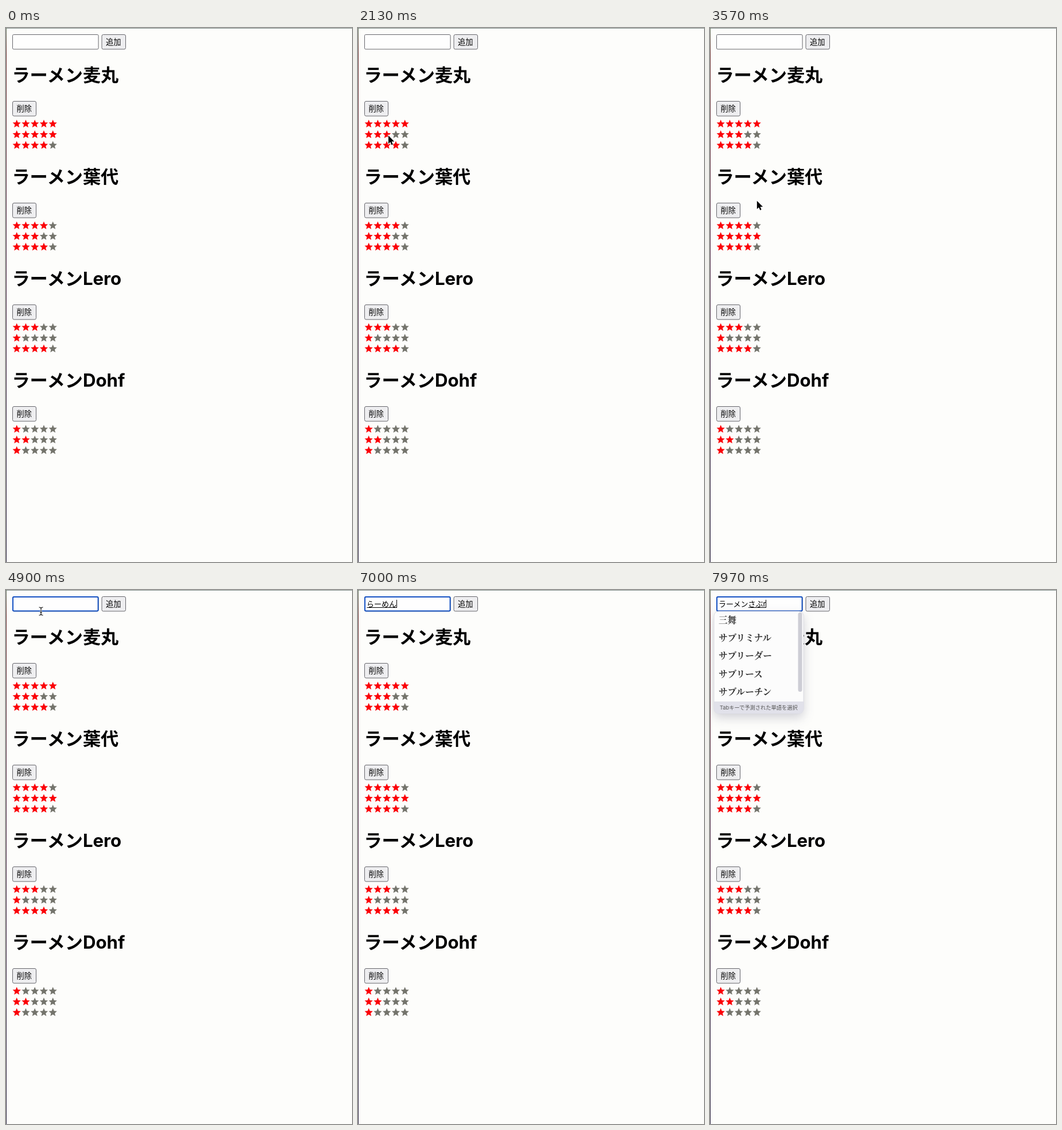
Animation, 603 px wide and 929 px high, one loop 8 s. Source, as an HTML page:

```html
<!DOCTYPE html>
<html lang="ja">
<head>
<meta charset="utf-8">
<title>Ramen ratings</title>
<style>
  html, body { margin: 0; width: 100%; height: 100%; overflow: hidden; background: #fdfdfb; }
  svg { display: block; width: 603px; height: 929px; }
  text { font-family: Inter, "Noto Sans CJK JP", "Noto Sans CJK", sans-serif; fill: #000; white-space: pre; }
  .title { font-size: 31.2px; font-weight: 700; }
  .label { font-size: 13.2px; }
  .typed { font-size: 13px; }
  .btn { fill: #eeeef0; stroke: #66666c; }
  .star { fill: #74746c; }
  .star.on { fill: #fb0007; }
  .word { font: 600 15.6px "Noto Serif CJK JP", "Noto Sans CJK JP", "Noto Sans CJK", serif; fill: #333; }
  .hint { font-size: 9.25px; fill: #555; }
  .panel { filter: drop-shadow(0 7px 9px rgba(40, 40, 80, .2)); }
</style>
</head>
<body>
<svg viewBox="0 0 603 929">
  <defs>
    <linearGradient id="edge" x1="0" y1="0" x2="0" y2="1">
      <stop offset="0" stop-color="#6c8068"/>
      <stop offset=".05" stop-color="#6e3030"/>
      <stop offset=".4" stop-color="#55304c"/>
      <stop offset="1" stop-color="#2b2440"/>
    </linearGradient>
    <clipPath id="round"><rect x="7" y="37" width="156" height="178" rx="8"/></clipPath>
  </defs>
  <rect width="603" height="929" fill="#fdfdfb"/>
  <rect width="603" height="1" fill="#87938f"/>
  <rect width="1" height="929" fill="url(#edge)"/>

  <rect x="11.5" y="11.5" width="149.6" height="25.4" rx="2" fill="#fefefe" stroke="#66666c"/>
  <rect id="ring" x="12" y="12" width="148.6" height="24.4" rx="2" fill="none" stroke="#1552c4" stroke-width="2"/>
  <text id="done" class="typed" x="15" y="28.6"></text>
  <text id="comp" class="typed" y="28.6"></text>
  <rect id="under" y="30" height="1"/>
  <rect id="caret" y="17" width="1" height="14"/>
  <rect class="btn" x="167" y="11.5" width="41.5" height="25.4" rx="2.5"/>
  <text class="label" x="174" y="28.5">追加</text>

  <g id="list"></g>

  <g id="menu">
    <rect class="panel" x="7" y="37" width="156" height="178" rx="8" fill="#fcfcfc" stroke="#d2d2da" stroke-width=".7"/>
    <rect x="7" y="194" width="156" height="21" fill="#e1e1ea" clip-path="url(#round)"/>
    <rect x="153.5" y="39" width="7" height="138" rx="3.5" fill="#cdcdd5"/>
    <g id="words"></g>
    <text class="hint" x="17" y="207.6">Tabキーで予測された単語を選択</text>
  </g>

  <g id="pointer">
    <path id="arrow" d="M0 0V14.4L3.3 11.3L5.5 16.4L7.8 15.4L5.7 10.4H10.2Z" stroke="#fff" paint-order="stroke" stroke-width="1.8"/>
    <g id="beam" fill="none">
      <path d="M-3.5 -7Q0 -7 0 -4V4Q0 7 -3.5 7M3.5 -7Q0 -7 0 -4V4Q0 7 3.5 7M-2 2H2" stroke="#fff" stroke-width="2.6"/>
      <path d="M-3.5 -7Q0 -7 0 -4V4Q0 7 -3.5 7M3.5 -7Q0 -7 0 -4V4Q0 7 3.5 7M-2 2H2" stroke="#111" stroke-width="1.1"/>
    </g>
  </g>
</svg>
<script>
const LOOP = 8000;
const $ = id => document.getElementById(id);
const show = (el, on) => el.setAttribute('visibility', on ? 'visible' : 'hidden');

const shops = [
  ['ラーメン麦丸', [5, 5, 4]],
  ['ラーメン葉代', [4, 3, 4]],
  ['ラーメンLero', [3, 1, 4]],
  ['ラーメンDohf', [1, 2, 1]]
];
const words = ['三舞', 'サブリミナル', 'サブリーダー', 'サブリース', 'サブルーチン'];

// time, x, y
const path = [
  [30, -3, 806], [400, 50, 560], [830, 60, 310], [1100, 54, 203], [1300, 51, 189],
  [1670, 53, 187], [2230, 53, 187], [2530, 74, 295], [2850, 83, 362], [3370, 84, 364],
  [3480, 86, 348], [3570, 82, 303], [3640, 71, 140], [3700, 60, 51],
  [3900, 60, 51], [4200, 61, 37], [6330, 61, 37]
];

// time, committed text, text being composed
const typing = [
  [0, '', ''], [6330, '', 'r'], [6430, '', 'ら'], [6560, '', 'らー'], [6690, '', 'らーm'],
  [6790, '', 'らーめ'], [6900, '', 'らーめn'], [7000, '', 'らーめん'], [7130, '', 'ラーメン'],
  [7300, 'ラーメン', ''], [7390, 'ラーメン', 's'], [7470, 'ラーメン', 'さ'],
  [7630, 'ラーメン', 'さb'], [7720, 'ラーメン', 'さぶ'], [7900, 'ラーメン', 'さぶr']
];

const FOCUS = 4400, TYPE = 6330, MENU = 7800;

function starPoints(cx, cy) {
  return Array.from({ length: 10 }, (_, i) => {
    const r = i % 2 ? 3.4 : 7.5, a = i * Math.PI / 5;
    return (cx + r * Math.sin(a)).toFixed(2) + ',' + (cy - r * Math.cos(a)).toFixed(2);
  }).join(' ');
}

function starRow(score, row) {
  return [0, 1, 2, 3, 4].map(i =>
    `<polygon class="star${i < score ? ' on' : ''}" points="${starPoints(18.7 + 15.75 * i, 166.9 + 18.6 * row)}"/>`
  ).join('');
}

$('list').innerHTML = shops.map(([name, scores], i) => `
  <g transform="translate(0 ${177 * i})">
    <text class="title" x="10.4" y="93.3">${name}</text>
    <rect class="btn" x="11.5" y="127.5" width="41" height="25.6" rx="2.5"/>
    <text class="label" x="18.6" y="144.7">削除</text>
    ${scores.map((s, row) => `<g>${starRow(s, row)}</g>`).join('')}
  </g>`).join('');
$('words').innerHTML = words.map((w, i) =>
  `<text class="word" x="15" y="${57.6 + 31.4 * i}">${w}</text>`).join('');

const rows = [...document.querySelectorAll('#list > g > g')];
const rate = (row, score) =>
  [...row.children].forEach((s, i) => s.classList.toggle('on', i < score));

function pointerAt(t) {
  const i = path.findIndex(p => p[0] > t);
  const [t0, x0, y0] = path[i - 1], [t1, x1, y1] = path[i];
  const k = (t - t0) / (t1 - t0);
  return [x0 + (x1 - x0) * k, y0 + (y1 - y0) * k];
}

function drawPointer(t) {
  const on = t >= 30 && t < TYPE;
  const [x, y] = on ? pointerAt(t) : [0, 0];
  const text = y < 38;
  $('pointer').setAttribute('transform', `translate(${x} ${y})`);
  show($('arrow'), on && !text);
  show($('beam'), on && text);
}

function drawInput(t) {
  const [, done, comp] = typing.filter(s => s[0] <= t).pop();
  $('done').textContent = done;
  $('comp').textContent = comp;
  const start = 15 + (done ? $('done').getComputedTextLength() : 0);
  const width = comp ? $('comp').getComputedTextLength() : 0;
  $('comp').setAttribute('x', start);
  $('under').setAttribute('x', start + .5);
  $('under').setAttribute('width', Math.max(0, width - .5));
  $('caret').setAttribute('x', Math.round(start + width));
  show($('ring'), t >= FOCUS);
  show($('caret'), t >= TYPE || t >= FOCUS && Math.floor((t - FOCUS) / 500) % 2 === 0);
}

function draw(t) {
  rate(rows[1], t < 1700 ? 5 : 3);
  rate(rows[4], t < 3000 ? 3 : 5);
  drawPointer(t);
  drawInput(t);
  show($('menu'), t >= MENU);
}

const began = performance.now();
function tick() {
  draw((performance.now() - began) % LOOP);
  requestAnimationFrame(tick);
}
tick();
</script>
</body>
</html>
```
